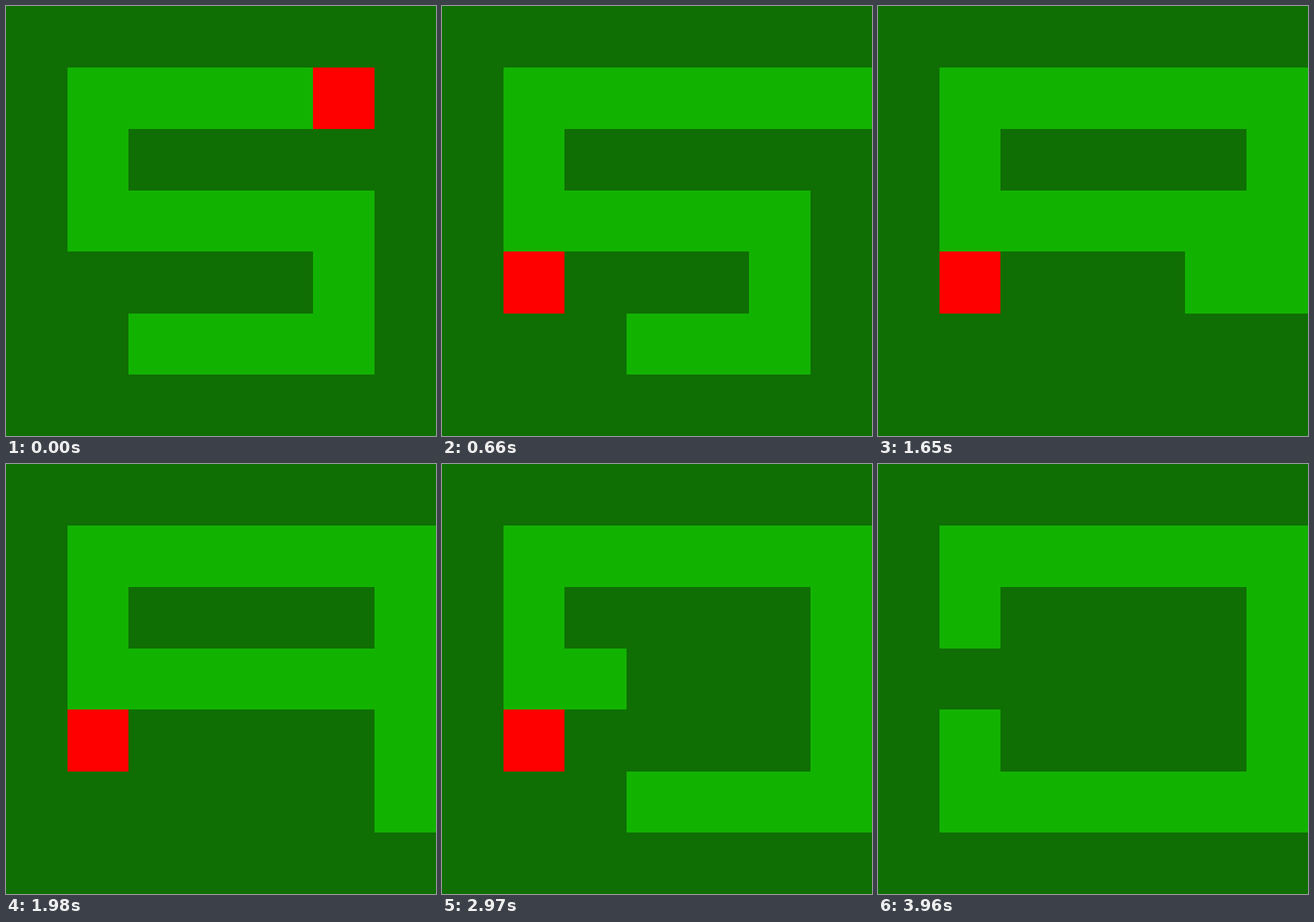
An HTML page for the animation above (4290 ms loop, 748 by 748 pixels).

```html
<!DOCTYPE html>
<html lang="en">
<head>
<meta charset="utf-8">
<title>Snake</title>
<style>
  html, body { margin: 0; width: 100%; height: 100%; overflow: hidden; background: #0f6e04; }
  svg { display: block; width: 100%; height: 100%; }
</style>
</head>
<body>
<svg viewBox="0 0 748 748" shape-rendering="crispEdges">
  <rect width="748" height="748" fill="#0f6e04"/>
  <path id="apple" fill="#ff0000"/>
  <path id="snake" fill="#12b300"/>
</svg>
<script>
const STEP_MS = 330;
const STEPS = 13;
const START_HEAD = 14;
const EDGES_X = [0, 107, 213, 321, 427, 534, 641, 748];
const EDGES_Y = [0, 107, 214, 321, 427, 535, 641, 748];
const CORNERS = [[2, 5], [5, 5], [5, 3], [1, 3], [1, 1], [6, 1], [6, 5], [1, 5], [1, 4]];

// Every cell on the route, from the first tail cell to the last head cell.
function walk(corners) {
  let [x, y] = corners[0];
  const cells = [[x, y]];
  for (const [toX, toY] of corners.slice(1)) {
    while (x !== toX || y !== toY) {
      x += Math.sign(toX - x);
      y += Math.sign(toY - y);
      cells.push([x, y]);
    }
  }
  return cells;
}

const route = walk(CORNERS);
const snake = document.getElementById("snake");
const apple = document.getElementById("apple");
let shown = -1;

const cellPath = ([x, y]) =>
  `M${EDGES_X[x]} ${EDGES_Y[y]}H${EDGES_X[x + 1]}V${EDGES_Y[y + 1]}H${EDGES_X[x]}Z`;

function draw(step) {
  // The tail rests whenever the head eats: on the first and the last move.
  const tail = Math.min(Math.max(step - 1, 0), STEPS - 3);
  const head = START_HEAD + step;
  snake.setAttribute("d", route.slice(tail, head + 1).map(cellPath).join(""));
  apple.setAttribute("d", cellPath(step === 0 ? [5, 1] : [1, 4]));
}

const start = performance.now();

function tick() {
  const step = Math.floor((performance.now() - start) / STEP_MS) % STEPS;
  if (step !== shown) draw(shown = step);
  requestAnimationFrame(tick);
}

tick();
</script>
</body>
</html>
```
